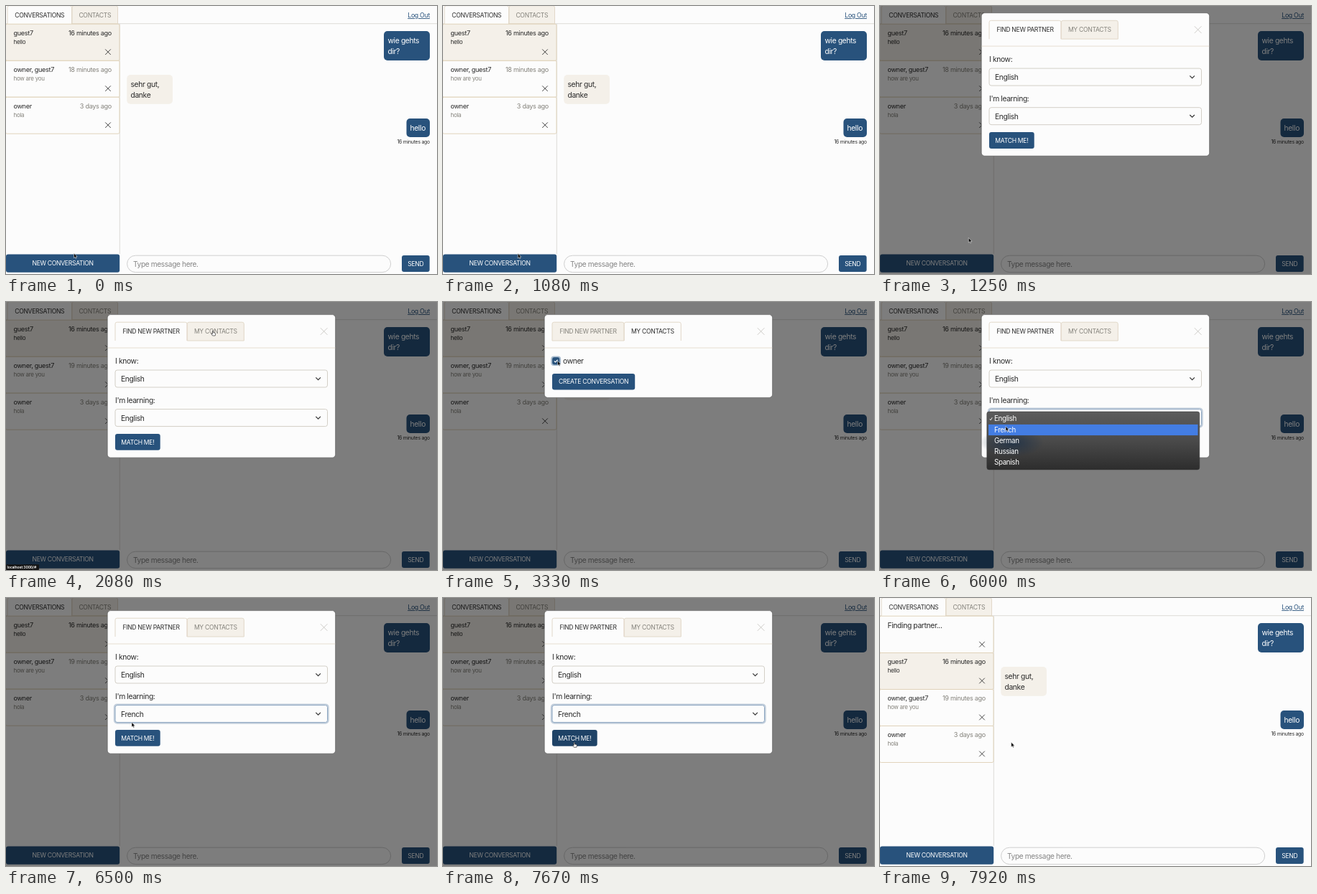
These frames come from a looping animation (600 by 374 pixels, 8000 ms). An HTML page:

```html
<!DOCTYPE html>
<html lang="en">
<head>
<meta charset="utf-8">
<title>Chat</title>
<style>
html, body { margin: 0; width: 100%; height: 100%; overflow: hidden; background: #fcfcfc; }
svg { display: block; width: 600px; height: 374px; }
text { font-family: Inter, "Liberation Sans", sans-serif; letter-spacing: -.035em; white-space: pre; }
</style>
</head>
<body>
<svg id="stage" viewBox="0 0 600 374"></svg>
<script>
const LOOP = 8000, STEP = 1000 / 12;
const BLUE = '#28527c', DEEP = '#1e4266', SAND = '#f4f0e9', EDGE = '#dfd5c4',
  INK = '#2b2b2b', GREY = '#85837c', PAPER = '#fcfcfc';
const stage = document.getElementById('stage');

const clamp = u => Math.max(0, Math.min(1, u));
const between = (t, a, b) => t >= a && t < b;

const text = (x, y, s, size, fill = INK, extra = '') =>
  `<text x="${x}" y="${y}" font-size="${size}" fill="${fill}" ${extra}>${s}</text>`;
const END = 'text-anchor="end"', MID = 'text-anchor="middle"';
const rect = (x, y, w, h, r, fill, extra = '') =>
  `<rect x="${x}" y="${y}" width="${w}" height="${h}" rx="${r}" fill="${fill}" ${extra}/>`;
const path = (d, stroke, width = 1, fill = 'none') =>
  `<path d="${d}" fill="${fill}" stroke="${stroke}" stroke-width="${width}"/>`;
const group = (body, x, y, opacity = 1) =>
  `<g transform="translate(${x} ${y})" opacity="${opacity}">${body}</g>`;
const cross = (x, y, r, color) =>
  path(`M${x - r} ${y - r}l${2 * r} ${2 * r}m0 ${-2 * r}l${-2 * r} ${2 * r}`, color, .9);
const button = (x, y, w, h, label, fill = BLUE) =>
  rect(x, y, w, h, 3, fill) + text(x + w / 2, y + h / 2 + 3.1, label, 8.6, '#fff', MID);

function tab(x, y, w, h, label, active) {
  const d = `M${x} ${y + h}V${y + 2.5}q0 -2.5 2.5 -2.5H${x + w - 2.5}q2.5 0 2.5 2.5V${y + h}`;
  return path(d + (active ? '' : 'z'), EDGE, .9, active ? PAPER : SAND) +
    text(x + w / 2, y + h / 2 + 3.3, label, 8.6, active ? INK : GREY, MID);
}

function row(y, name, time, last, active) {
  return rect(-.5, y, 158.5, 51, 2, active ? SAND : PAPER, 'stroke="#dfd1b6" stroke-width=".9"') +
    text(10.5, y + 15.7, name, 9.1) +
    text(147, y + 15.7, time, 9.1, active ? INK : GREY, END) +
    text(10.5, y + 27.5, last, 8, active ? INK : GREY) +
    cross(142, y + 39, 3.8, '#333');
}

function page(t) {
  const found = t >= 7820, top = found ? 76.5 : 25.2;
  const minutes = t < 1490 ? 18 : 19;
  const finding = rect(-.5, 25.2, 158.5, 51.3, 2, PAPER, 'stroke="#dfd1b6" stroke-width=".9"') +
    text(10.5, 42.3, 'Finding partner...', 10.3) + cross(142, 64.7, 3.8, '#333');
  return rect(0, 0, 600, 374, 0, PAPER) +
    path('M0 24.7H600M158.3 25V346', '#dad8d4', .9) +
    tab(2, -.3, 89.5, 25.4, 'CONVERSATIONS', true) +
    tab(92, -.3, 63.5, 25, 'CONTACTS', false) +
    text(590, 16, 'Log Out', 8.8, BLUE, END + ' text-decoration="underline"') +
    (found ? finding : '') +
    row(top + 51, 'owner, guest7', minutes + ' minutes ago', 'how are you') +
    row(top + 102, 'owner', '3 days ago', 'hola') +
    row(top, 'guest7', '16 minutes ago', 'hello', true) +
    rect(526, 35, 64, 41, 5, BLUE) +
    text(531.5, 51.8, 'wie gehts', 10.3, '#fff') + text(531.5, 67, 'dir?', 10.3, '#fff') +
    rect(168.3, 96, 63.7, 40.7, 5, SAND) +
    text(173.5, 112.8, 'sehr gut,', 10.3) + text(173.5, 128.2, 'danke', 10.3) +
    rect(557.5, 157, 32.5, 26, 5, BLUE) + text(562.5, 173.7, 'hello', 10.3, '#fff') +
    text(590, 192.3, '16 minutes ago', 6.9, INK, END) +
    button(0, 346.6, 158.2, 25.2, 'NEW CONVERSATION') +
    rect(168.6, 348.2, 367, 23.4, 11.7, PAPER, 'stroke="#cfcfcf"') +
    text(177, 363.5, 'Type message here.', 10.15, '#858585') +
    button(551, 348, 38.7, 23, 'SEND');
}

function select(y, value, focus) {
  return (focus ? rect(150.8, y - 1.2, 297.9, 26.4, 4, 'none', 'stroke="#c3cfdc" stroke-width="2"') : '') +
    rect(152, y, 295.5, 24, 3, PAPER, `stroke="${focus ? '#7f9cba' : '#cfcac1'}" stroke-width=".9"`) +
    text(160, y + 15.9, value, 10.3) +
    path(`M431.3 ${y + 10.3}l3.3 3.3 3.3 -3.3`, '#333', 1.2);
}

function partnerForm(t) {
  return text(152, 86.1, 'I know:', 10.3) + select(95, 'English') +
    text(152, 140.7, "I'm learning:", 10.3) +
    select(149.6, t < 6240 ? 'English' : 'French', t > 5740) +
    button(152, 184, 62.7, 22.8, 'MATCH ME!', t > 6990 ? DEEP : BLUE);
}

function contactForm(t) {
  const checked = between(t, 2910, 3740), pressed = between(t, 3570, 3740);
  return (t > 2910 ? rect(151.3, 76.5, 11.8, 11.6, 3, 'none', 'stroke="#a9bccf" stroke-width="2"') : '') +
    rect(152.5, 77.6, 9.4, 9.4, 2, checked ? (pressed ? DEEP : BLUE) : PAPER,
      `stroke="${checked ? BLUE : '#aaa'}" stroke-width=".8"`) +
    (checked ? path('M154.8 82.4l1.6 1.6 3.2 -3.3', '#fff', 1.2) : '') +
    text(167, 86.1, 'owner', 10.3) +
    button(152, 100, 115.2, 22.6, 'CREATE CONVERSATION');
}

function modal(t) {
  const contacts = between(t, 2160, 4490);
  return rect(141.2, 17.6, 317.4, contacts ? 115.8 : 199.6, 4.5, PAPER, 'stroke="#555" stroke-width=".6"') +
    path('M141.5 64H458.3', EDGE, .8) +
    tab(152, 28.2, 100, 25.8, 'FIND NEW PARTNER', !contacts) +
    tab(252.3, 28.2, 79, 25.8, 'MY CONTACTS', contacts) +
    cross(442.6, 41, 4.8, '#c9c7c2') +
    (contacts ? contactForm(t) : partnerForm(t));
}

function menu(t) {
  const langs = ['English', 'French', 'German', 'Russian', 'Spanish'];
  const pick = t < 5910 ? 0 : 1;
  return `<defs><linearGradient id="glass" x2="0" y2="1">
      <stop stop-color="#5c5c5c"/><stop offset=".5" stop-color="#4a4a4a"/><stop offset="1" stop-color="#2d2d2d"/>
    </linearGradient><radialGradient id="tint">
      <stop stop-color="#1c3048" stop-opacity=".8"/><stop offset="1" stop-color="#1c3048" stop-opacity="0"/>
    </radialGradient></defs>` +
    rect(148.8, 153, 296, 81, 3, 'url(#glass)', 'stroke="#333" stroke-width=".5"') +
    '<ellipse cx="184" cy="196" rx="44" ry="20" fill="url(#tint)"/>' +
    rect(151, 155.6 + 15.3 * pick, 291.5, 15.2, 0, '#437de3') +
    path('M152.8 163.3l1.2 1.6 2.2 -3.6', '#fff', .9) +
    langs.map((s, i) => text(159, 166.4 + 15.25 * i, s, 9.8, '#fff')).join('');
}

// Pointer stops: time, x, y
const STOPS = [[0, 94.5, 345], [170, 97.5, 353], [1000, 97.5, 353], [1250, 123.3, 323.5],
  [1420, 128, 318], [1840, 288, 40], [2250, 288, 40], [2670, 159.5, 82], [3910, 159.5, 82],
  [4250, 201, 39], [4670, 201, 39], [5083, 183.3, 126], [5670, 176, 161], [5840, 176, 163],
  [6000, 175, 173.5], [6580, 175, 173.5], [7083, 182.7, 201.3], [LOOP, 182.7, 201.3]];
const HANDS = [[160, 1070], [1800, 2330], [4230, 4740], [6990, 7820]];
const ARROW = path('M0 0V6.6L1.5 5.3 2.5 7.5 3.6 7 2.6 4.9H4.7z', '#fff', .5, '#000');
const HAND = path('M-.6 .2q.6 -.7 1.2 0V2.7L3 3.2q.8 .3 .7 1.2L3.2 7H-.4L-2.3 4.4q.3 -.8 1.7 .2z', '#111', .6, '#fff');

function pointer(t) {
  const i = STOPS.findIndex(s => s[0] > t);
  const [t0, x0, y0] = STOPS[i - 1], [t1, x1, y1] = STOPS[i];
  const u = (t - t0) / (t1 - t0), e = u * u * (3 - 2 * u);
  const hand = HANDS.some(([a, b]) => between(t, a, b));
  return group(hand ? HAND : ARROW, x0 + (x1 - x0) * e, y0 + (y1 - y0) * e);
}

function status(t) {
  const a = between(t, 1990, 4000) ? clamp((3333 - t) / 250) :
    between(t, 4410, 6000) ? clamp((6000 - t) / 300) : 0;
  return group(rect(0, 366.3, 46, 7.7, 1, '#151515') +
    text(1.5, 372, 'localhost:3000/#', 5.2, '#fff', 'font-weight="600"'), 0, 0, a);
}

function scene(t) {
  const closing = t > 7680;
  const shown = closing ? 1 - clamp((t - 7680) / 150) : clamp((t - 1100) / 150);
  const u = clamp(closing ? (t - 7680) / 300 : (t - 1100) / 300);
  const lift = -31.7 * (closing ? 1 - (1 - u) ** 2 : (1 - u) ** 2);
  return page(t) +
    (shown ? rect(0, 0, 600, 374, 0, '#000', `opacity="${shown / 2}"`) + group(modal(t), 0, lift, shown) : '') +
    (between(t, 5740, 6500) ? group(menu(t), 0, 0, clamp((6500 - t) / 250)) : '') +
    status(t) + pointer(t);
}

let last = -1;
function tick(now) {
  const step = Math.floor((now % LOOP + 4) / STEP) % 96;
  if (step !== last) stage.innerHTML = scene((last = step) * STEP);
  requestAnimationFrame(tick);
}
tick(performance.now());
</script>
</body>
</html>
```
